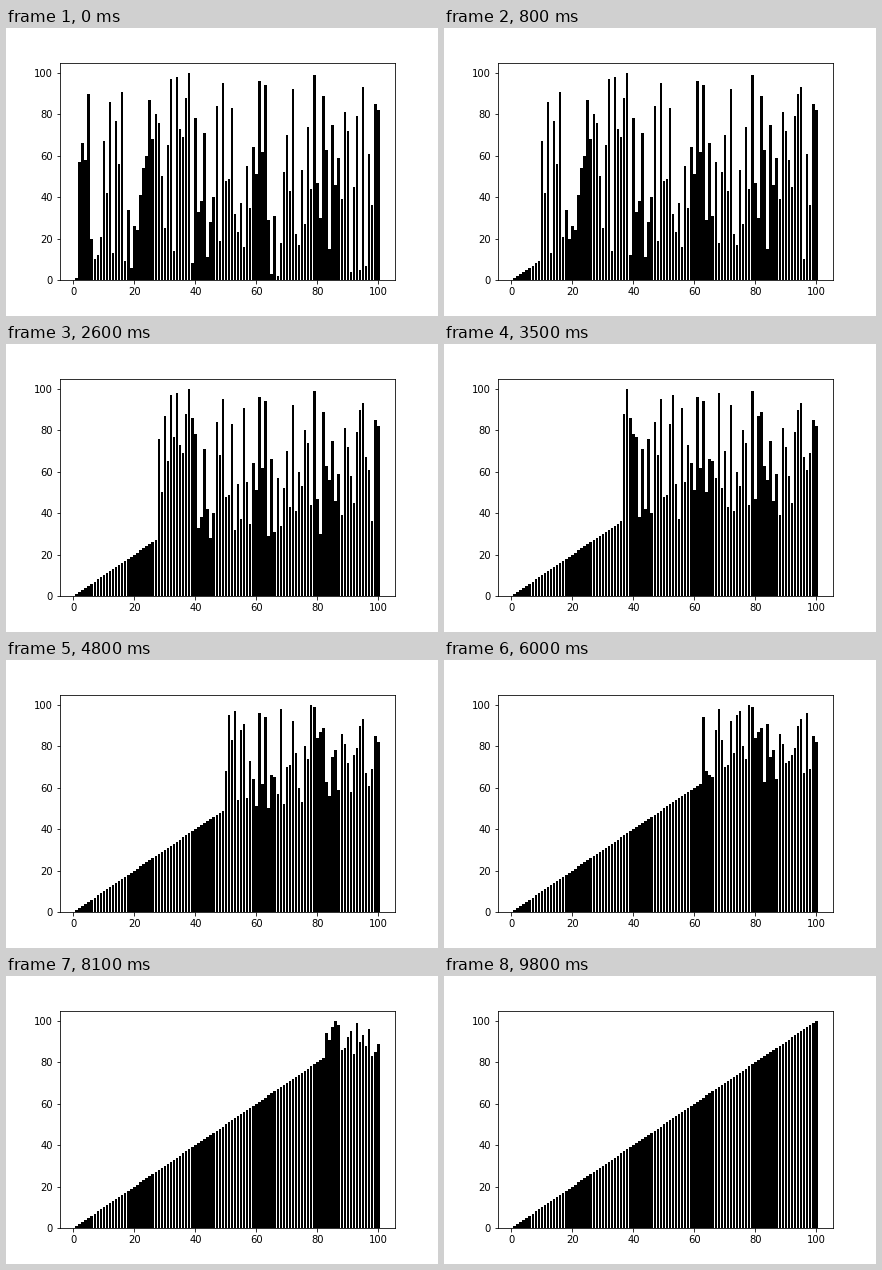
Write a matplotlib script that moves like this. It is 432 by 288 pixels and loops after 10000 ms.

```python
import matplotlib.pyplot as plt
from matplotlib.animation import FuncAnimation

VALUES = [
    1, 57, 66, 58, 90, 20, 10, 12, 21, 67,
    42, 86, 13, 77, 56, 91, 9, 34, 6, 26,
    24, 41, 54, 60, 87, 68, 80, 76, 50, 25,
    65, 97, 14, 98, 73, 69, 88, 100, 8, 78,
    33, 38, 71, 11, 28, 40, 84, 19, 95, 48,
    49, 83, 32, 23, 37, 16, 55, 35, 64, 51,
    96, 62, 94, 29, 3, 31, 2, 18, 52, 70,
    43, 92, 22, 17, 53, 27, 74, 44, 99, 47,
    30, 89, 63, 15, 75, 46, 59, 39, 81, 72,
    4, 45, 79, 5, 93, 7, 61, 36, 85, 82,
]


def selection_sort(values):
    """Return the list as it stands after each swap."""
    a = list(values)
    states = []
    for i in range(len(a)):
        j = a.index(min(a[i:]), i)
        a[i], a[j] = a[j], a[i]
        states.append(a[:])
    return states


states = selection_sort(VALUES)

plt.rcParams.update({"font.family": "DejaVu Sans", "font.size": 10})
fig, ax = plt.subplots(figsize=(6, 4), dpi=72, facecolor="white")
fig.subplots_adjust(left=0.125, right=0.9, bottom=0.125, top=0.88)
bars = ax.bar(range(1, len(VALUES) + 1), VALUES, color="black")


def update(step):
    for bar, height in zip(bars, states[step]):
        bar.set_height(height)
    return bars.patches


anim = FuncAnimation(fig, update, frames=len(states), interval=100,
                     init_func=lambda: update(0), repeat=True, repeat_delay=0)
plt.show()
```
